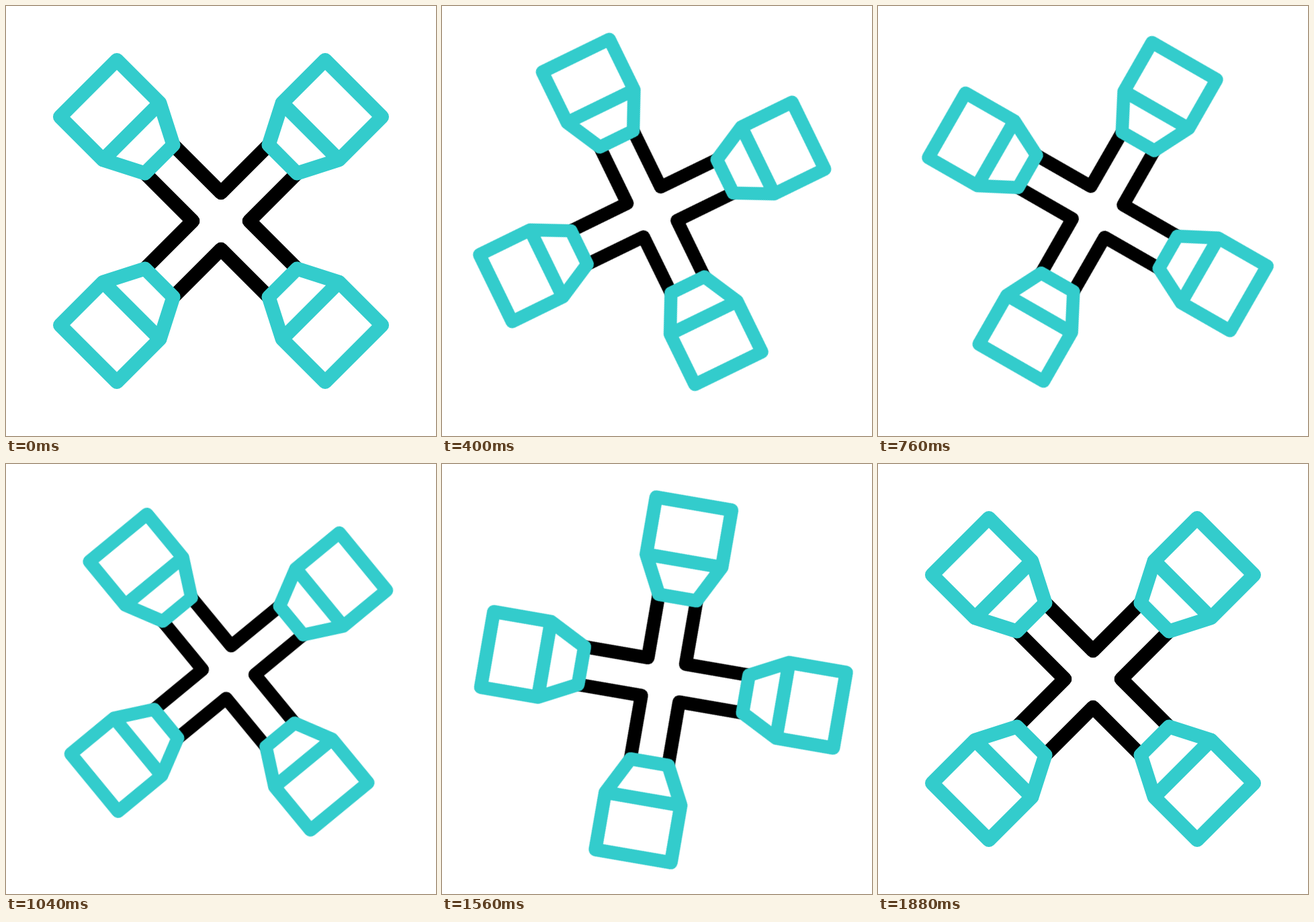
Recreate the animation shown at these times as an HTML page. Size 640 px wide and 640 px high, loop 2 s.

```html
<!DOCTYPE html>
<html lang="en">
<head>
<meta charset="utf-8">
<title>Spinning cross</title>
<style>
  html, body { margin: 0; width: 100%; height: 100%; overflow: hidden; background: #fff; }
  svg { display: block; width: 100%; height: 100%; }
  .cross {
    fill: none;
    stroke-width: 20.9;
    stroke-linejoin: round;
    transform-origin: 0 0;
    animation: turn 2s linear infinite;
  }
  .arm { stroke: #000; }
  .head { stroke: #3cc; stroke-linecap: round; }

  /* Turns in four stages; shrinks towards one head, grows back on the last turn */
  @keyframes turn {
    0%, 5% { transform: rotate(0deg) translate(0px, 0px) scale(1); }
    19.25%, 27% { transform: rotate(19deg) translate(-11.28px, -10.41px) scale(.928); }
    37.25%, 46% { transform: rotate(74.85deg) translate(-11.28px, -10.41px) scale(.928); }
    60.6%, 69% { transform: rotate(124.8deg) translate(-11.28px, -10.41px) scale(.928); }
    94%, 100% { transform: rotate(180deg) translate(0px, 0px) scale(1); }
  }
</style>
</head>
<body>
<svg viewBox="0 0 640 640">
  <defs>
    <path id="arm" d="M-71-113.2 0-42.2 71-113.2"/>
    <path id="head" d="M-155-239.6-91-175.6-71-113.2-113.2-71-175.6-91-239.6-155ZM-91-175.6-175.6-91"/>
  </defs>
  <g transform="translate(320 320)">
    <g class="cross">
      <g class="arm">
        <use href="#arm"/>
        <use href="#arm" transform="rotate(90)"/>
        <use href="#arm" transform="rotate(180)"/>
        <use href="#arm" transform="rotate(270)"/>
      </g>
      <g class="head">
        <use href="#head"/>
        <use href="#head" transform="rotate(90)"/>
        <use href="#head" transform="rotate(180)"/>
        <use href="#head" transform="rotate(270)"/>
      </g>
    </g>
  </g>
</svg>
</body>
</html>
```
